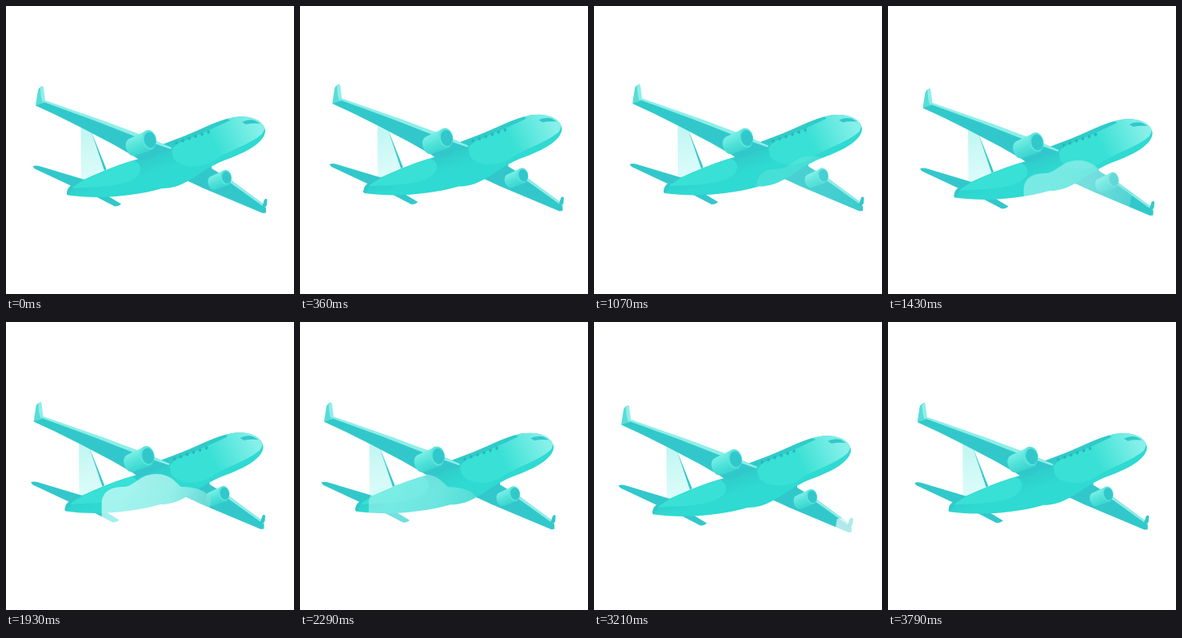
An HTML page with a canvas for the animation above (3870 ms loop, 360 by 360 pixels).

```html
<!DOCTYPE html>
<html lang="en">
<head>
<meta charset="utf-8">
<title>Airplane</title>
<style>
html, body { margin: 0; width: 100%; height: 100%; overflow: hidden; background: #fff; }
canvas { display: block; width: 360px; height: 360px; }
</style>
</head>
<body>
<canvas id="stage" width="360" height="360"></canvas>
<script>
const ctx = document.getElementById('stage').getContext('2d');
const LOOP = 3870, FPS = 14, FRAMES = 54;

// Flight drift: time, x, y
const drift = [
  [0, 0, 0], [570, 5.3, -4], [710, 6, -4.5], [1140, 12, -2], [1430, 6.5, 3],
  [1710, 2, 1.8], [1930, -2.5, 0], [2290, -7, 0.3], [2430, -8, 1.5],
  [2710, -7, 4.5], [3210, -3, 4], [3430, -1.2, 3], [3790, -0.3, 0.6], [LOOP, 0, 0]
];
const cloudAlpha = [[0, 0], [900, 0], [1430, 0.5], [1930, 0.78], [2710, 0.1], [3000, 0], [LOOP, 0]];
const tipAlpha = [[0, 0], [2350, 0], [2650, 1], [2760, 1], [3210, 0.62], [3650, 0], [LOOP, 0]];
const wingletAlpha = [[0, 0], [2760, 0], [3210, 0.62], [3650, 0], [LOOP, 0]];

const color = {
  wing: '#32c8cb', body: '#2edad1', panel: '#38e0d5', nose: '#86f0e9',
  roof: '#30cbc9', glass: '#28b5ba', edge: '#8feee8'
};

const shape = {
  body: 'M76 235C77 229 80 224 88 221C120 207 145 196 170 190L188 176L213 166.500C240 157 262 143 285 139C302 136.500 321 141 324 155C325 167 308 180 278 191C265 196 257 200 248 206C232 216 216 228.500 195 228C160 238 115 242 77 236.500Z',
  rear: 'M80 228C100 213 140 194 160 193C171 198 171 210 158 217C138 227 112 226 80 228Z',
  front: 'M207 181C212 168 245 158 282 138H322Q326 152 320 160C305 173 278 181 263 191C249 203 219 205 209 190Z',
  roof: 'M188 176L213 165L275 140L280 143L252 156L205 176Z',
  fin: 'M93.500 150L107 156L124 204L94 218Z',
  finEdge: 'M107 158L125.500 204L123 206Z',
  leftTail: 'M33.500 200.500Q37 198.500 43 200.500L98 217L84 226L36 203.500Z',
  rightTail: 'M110 237L125 236L144 247.500Q141 250.500 136 250.500Z',
  cone: 'M76 235C76 229 79 224 85 223Q83 231 78 236Z',
  leftWing: 'M37 124.500L48 118.500L171 162L207 177L207 180L190 184Q183 192 167 193L161 188.500L135 173.500L95 152.500L63 136.500Z',
  leftEdge: 'M47 120L49 118L125 144.500L171 162L207 177L206 179L169 166L110 143Z',
  tipPanel: 'M46 124L66 130L72 137L63 135L42 125Z',
  tipFace: 'M37 124.500L40 105Q41 102 46 100L48 121Z',
  tipEdge: 'M43 102Q46 99 47 102L49 118L46 121Q43 114 43 102Z',
  rightWing: 'M222 217L225 200L257 197V203L283 219L325 250V258.500L321 259L246 227.500L230 220Z',
  rightEdge: 'M282 218.500L325 250V253L279 220Z',
  rightTip: 'M320 251L323 242Q325 240 326.500 242L326 249L323 252Z',
  cockpit: 'M295 145Q303 141 311 143L318 147Q307 146 300 148Z',
  cloud: 'M122 260V224C124 211 134 206 150 206C164 205 169 190 190 190C206 190 213 198 221 206C241 206 253 211 259 222L252 260Z',
  engine: 'M-4 -11L-25 -1C-31 2 -31 12 -24 19Q-22 21 -17 20L6 12Z'
};
for (const key in shape) shape[key] = new Path2D(shape[key]);

function fill(path, style) {
  ctx.fillStyle = style;
  ctx.fill(path);
}

function gradient(x0, y0, x1, y1, ...stops) {
  const g = ctx.createLinearGradient(x0, y0, x1, y1);
  stops.forEach((c, i) => g.addColorStop(i / (stops.length - 1), c));
  return g;
}

function disc(x, y, rx, ry, angle, style) {
  const p = new Path2D();
  p.ellipse(x, y, rx, ry, angle, 0, Math.PI * 2);
  fill(p, style);
}

// Linear interpolation over rows of [time, ...values]
function ramp(keys, t) {
  let i = 0;
  while (i < keys.length - 2 && t >= keys[i + 1][0]) i++;
  const [a, b] = [keys[i], keys[i + 1]];
  const p = (t - a[0]) / (b[0] - a[0]);
  return a.slice(1).map((v, n) => v + (b[n + 1] - v) * p);
}

function engine(x, y, size) {
  ctx.save();
  ctx.translate(x, y);
  ctx.scale(size, size);
  fill(shape.engine, gradient(-18, -4, -9, 17, '#78efe5', '#52e2d9', '#3ad6d0'));
  disc(0, 0, 9, 12, -0.2, '#5de5dc');
  disc(1, 0.5, 7.4, 10, -0.2, color.wing);
  ctx.restore();
}

function drawBody() {
  fill(shape.body, gradient(180, 185, 195, 230, color.roof, color.body, color.body));
  ctx.save();
  ctx.clip(shape.body);
  fill(shape.rear, color.panel);
  fill(shape.front, gradient(205, 195, 312, 145, color.panel, color.panel, color.nose));
  fill(shape.roof, color.roof);
  ctx.restore();
  for (let i = 0; i < 6; i++) disc(213 + 8 * i, 171 - 2.7 * i, 1.7, 2, 0.2, color.glass);
  fill(shape.cockpit, color.wing);
  fill(shape.cone, color.wing);
}

function drawPlane() {
  fill(shape.fin, gradient(96, 155, 110, 215, '#c0f6f2', '#cff9f6', '#dcfcfa'));
  fill(shape.finEdge, color.wing);
  fill(shape.rightTail, color.wing);
  fill(shape.rightWing, color.wing);
  fill(shape.rightEdge, color.edge);
  drawBody();
  fill(shape.leftTail, color.wing);
  fill(shape.leftWing, color.wing);
  fill(shape.tipPanel, color.roof);
  fill(shape.leftEdge, color.edge);
  fill(shape.tipFace, '#58dcd7');
  fill(shape.tipEdge, color.edge);
  engine(179, 167, 1);
  engine(275, 214, 0.77);
}

// Pale light that slides over the aircraft only
function drawLight(t) {
  ctx.save();
  ctx.globalCompositeOperation = 'source-atop';
  ctx.save();
  ctx.globalAlpha = ramp(cloudAlpha, t)[0];
  ctx.translate((1930 - t) * 0.082, 0);
  fill(shape.cloud, gradient(160, 195, 258, 225, '#c4faf6', '#b4f4f0', '#72dfda'));
  ctx.restore();

  ctx.globalAlpha = ramp(tipAlpha, t)[0];
  const left = 317 - (t - 2710) * 0.028;
  fill(new Path2D(`M${left} 264L${left + 4} 242L332 238V264Z`), '#fff');
  ctx.restore();
}

function drawWinglet(t) {
  fill(shape.rightTip, color.wing);
  ctx.globalAlpha = ramp(wingletAlpha, t)[0];
  fill(shape.rightTip, '#fff');
}

function draw(t) {
  ctx.clearRect(0, 0, 360, 360);
  ctx.save();
  ctx.translate(...ramp(drift, t));
  drawPlane();
  drawLight(t);
  drawWinglet(t);
  ctx.restore();
}

const start = performance.now();
function tick() {
  const t = (performance.now() - start) % LOOP;
  const step = Math.min(FRAMES - 1, Math.floor((t + 5) * FPS / 1000));
  draw(step * 1000 / FPS);
  requestAnimationFrame(tick);
}
tick();
</script>
</body>
</html>
```
